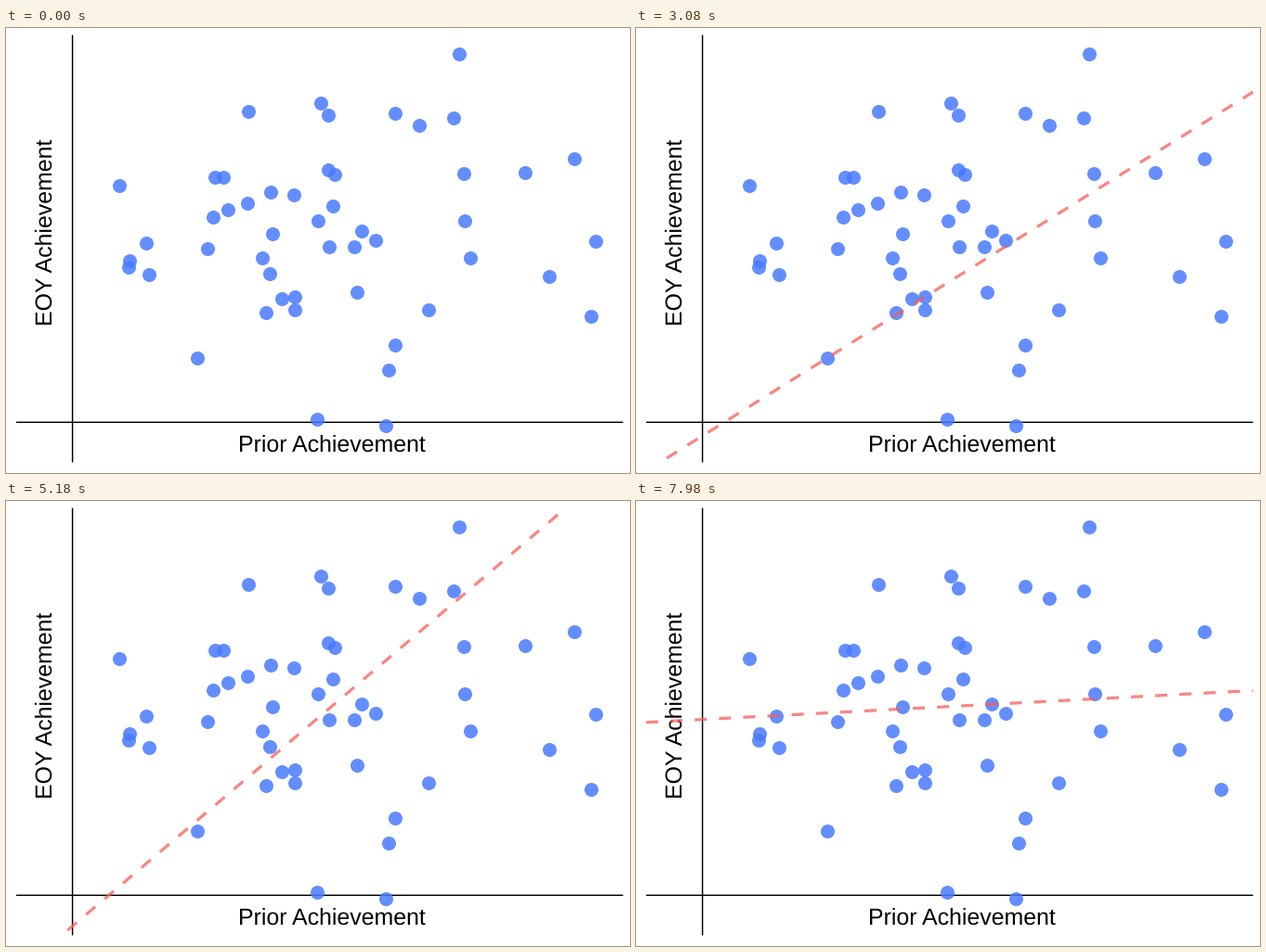
A matplotlib script that plays this animation: 672x480 px, repeating every 8000 ms.

```python
import matplotlib.pyplot as plt
from matplotlib.animation import FuncAnimation
from matplotlib.patches import Rectangle

W, H, DPI = 672, 480, 96
PX = 72 / DPI  # points per pixel
STEP, LOOP = 20, 8000
FIRST, HOLD = 980, 700  # ms before the first line, ms per line
LEFT, TOP, RIGHT, BOTTOM = 11, 7.5, 664.5, 468.5

DOTS = [
    (488, 28), (261, 89.5), (338.5, 81), (346.5, 93.5), (418.5, 91.5),
    (445, 104.5), (481.5, 97), (612, 141), (559, 155.5), (493, 156.5),
    (121.5, 169.5), (224.5, 161), (233.5, 160.5), (347, 153), (354, 158),
    (285, 177), (310, 179.5), (260, 188.5), (239, 196), (223, 203.5),
    (351.5, 191.5), (335.5, 208), (494, 208), (287, 222), (382.5, 218.5),
    (397.5, 229), (151, 231.5), (216.5, 238), (347.5, 236), (374.5, 236),
    (635, 230), (500, 247.5), (276, 247.5), (133, 251), (131.5, 258),
    (153.5, 265.5), (283.5, 265), (585, 267.5), (377.5, 284.5), (297, 291.5),
    (311, 290), (311, 303.5), (280, 307), (455, 303.5), (629.5, 310.5),
    (418.5, 342), (206, 356), (412, 368.5), (335, 422), (408.5, 429),
]

# A point on each candidate line and its upward slope
FITS = [
    (169.4, 459.2, 1.3166), (104.4, 461.7, 0.981), (11, 250.5, 0.2243),
    (11, 477.8, 0.6255), (11, 369, 0.43), (173.7, 460.7, 1.1),
    (66.2, 463.1, 0.849), (125.5, 459.5, 1.261), (357, 220, 0.406),
    (131, 461, 1.063), (11, 238.8, 0.0525),
]

plt.rcParams["text.hinting"] = "none"
fig = plt.figure(figsize=(W / DPI, H / DPI), dpi=DPI, facecolor="white")
ax = fig.add_axes([0, 0, 1, 1])
ax.set_xlim(0, W)
ax.set_ylim(H, 0)
ax.axis("off")

for xs, ys in (([71.6, 71.6], [TOP, BOTTOM]), ([LEFT, RIGHT], [425.3, 425.3])):
    ax.plot(xs, ys, color="black", lw=1.45 * PX, solid_capstyle="butt",
            snap=False, zorder=1)

ax.scatter(*zip(*DOTS), s=(15 * PX) ** 2, color="#497aff", alpha=0.85,
           linewidths=0, zorder=2)

label = dict(family="Liberation Sans", size=24.9 * PX, color="black",
             ha="center", va="baseline", rotation_mode="anchor", zorder=3)
ax.text(350.5, 457, "Prior Achievement", **label)
ax.text(49.7, 220.5, "EOY Achievement", rotation=90, **label)

fit, = ax.plot([], [], color="#f55f5a", alpha=0.75, lw=3.267 * PX,
               ls=(0, (4, 4)), dash_capstyle="butt", zorder=4)
fit.set_clip_path(Rectangle((LEFT, TOP), RIGHT - LEFT, BOTTOM - TOP,
                            transform=ax.transData))


def ends(x, y, slope):
    """Run from the panel's left side, or the stage's bottom, to the right."""
    x0 = max(LEFT, x - (H - y) / slope)
    return [x0, RIGHT], [y - slope * (x0 - x), y - slope * (RIGHT - x)]


def update(frame):
    index = (frame * STEP - FIRST) // HOLD
    if index < 0:
        fit.set_data([], [])
    else:
        fit.set_data(*ends(*FITS[index]))
    return fit,


anim = FuncAnimation(fig, update, frames=LOOP // STEP, interval=STEP,
                     repeat=True, repeat_delay=0, blit=True)
plt.show()
```
